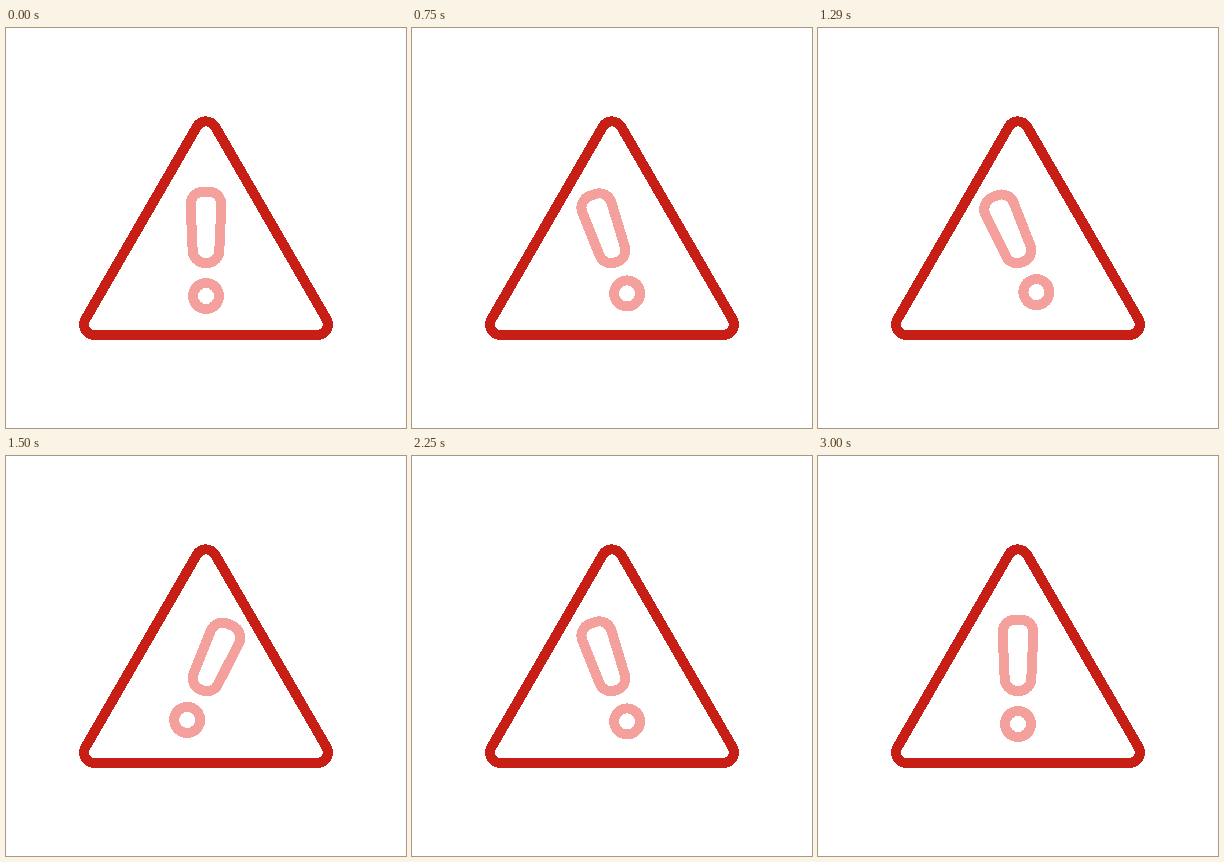
These frames come from a looping animation (400x400 px, 5030 ms). An HTML page without scripts:

```html
<!DOCTYPE html>
<html lang="en">
<head>
<meta charset="utf-8">
<title>Warning sign</title>
<style>
  @property --time { syntax: "<number>"; inherits: false; initial-value: 0; }
  @property --power { syntax: "<number>"; inherits: false; initial-value: 0; }

  html, body { margin: 0; width: 100%; height: 100%; overflow: hidden; background: #fff; }
  svg { display: block; width: 100%; height: 100%; shape-rendering: crispEdges; }

  .edge { stroke-linejoin: round; }
  .outer { stroke: #c71f16; stroke-width: 31.2; }
  .inner { stroke: #fff; stroke-width: 11.2; fill: #fff; }

  /* A slightly uneven swing every 300 ms (1.2deg of phase per ms), scaled by --power.
     Its phase rests at an extreme while the power rises or fades. */
  .mark {
    --phase: calc(clamp(114, var(--time), 2676) * 1.2deg);
    --swing: cos(var(--phase) + 36.5deg - 8.5deg * cos(var(--phase)));
    fill: none;
    stroke: #f4a09c;
    stroke-width: 10;
    transform-origin: 200px 222.5px;
    transform: rotate(calc(28deg * var(--power) * var(--swing)));
    animation: clock 5030ms linear infinite, fade 5030ms ease-in-out infinite;
  }
  @keyframes clock { to { --time: 5030; } }
  @keyframes fade {
    0%, 59.6%, 100% { --power: 0; }
    2.3%, 50.1% { --power: 1; }
    53.2% { --power: .27; }
  }
</style>
</head>
<body>
<svg viewBox="0 0 400 400">
  <defs>
    <path id="triangle" d="M200 104 L311.3 296.4 H88.7 Z"/>
  </defs>
  <use href="#triangle" class="edge outer"/>
  <use href="#triangle" class="edge inner"/>
  <g class="mark">
    <path d="M184.6 176.6 A12.8 12.8 0 0 1 197.4 163.6 H202.6 A12.8 12.8 0 0 1 215.4 176.6
             L213.3 222.8 A12.2 12.2 0 0 1 201.1 234.9 H198.9 A12.2 12.2 0 0 1 186.7 222.8 Z"/>
    <circle cx="200" cy="268" r="13"/>
  </g>
</svg>
</body>
</html>
```
